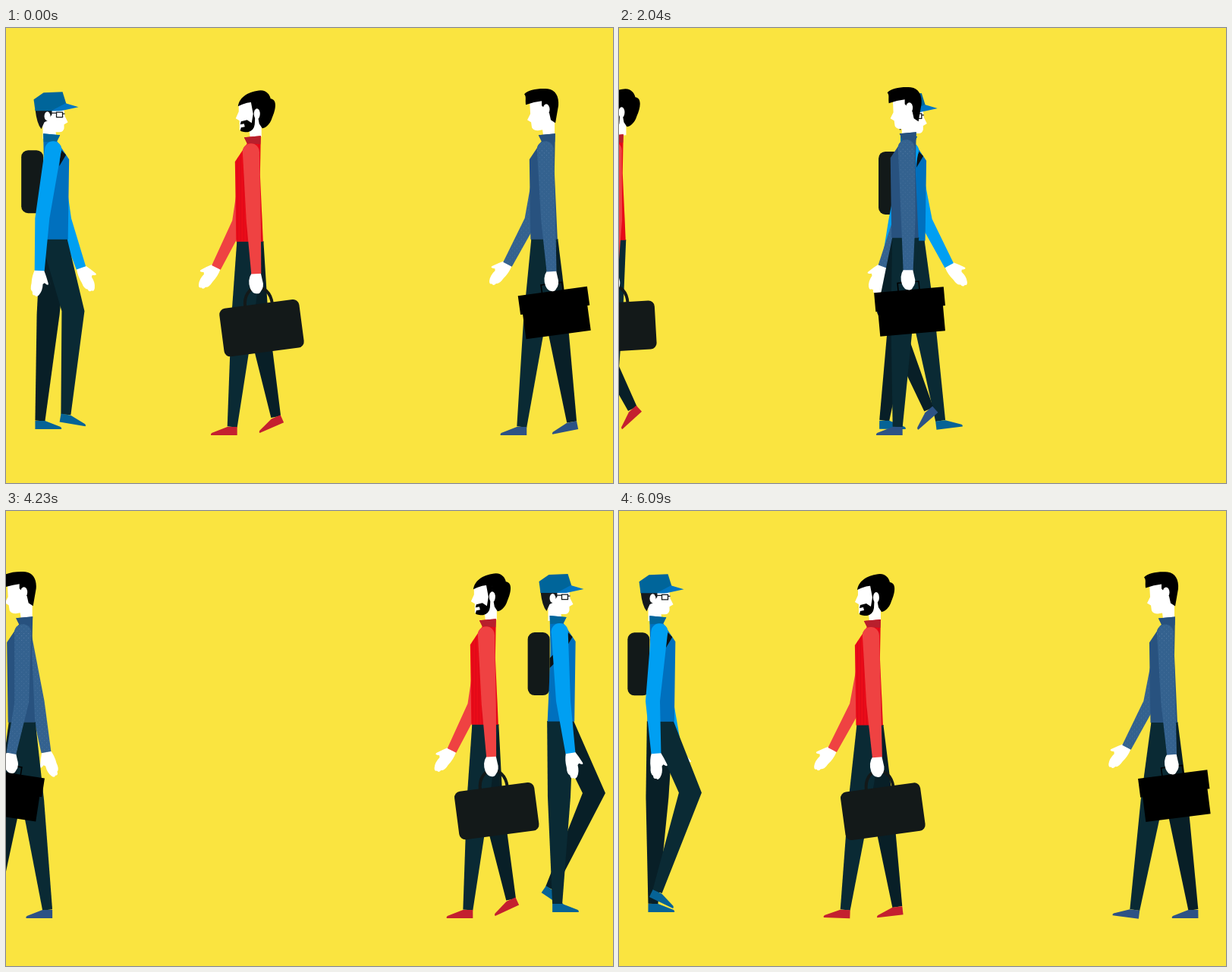
Write an HTML page with a canvas that moves like this. It is 800x600 px and loops after 6.12 s.

```html
<!DOCTYPE html>
<html lang="en">
<head>
<meta charset="utf-8">
<title>Three walkers</title>
<style>
html, body { margin: 0; width: 100%; height: 100%; overflow: hidden; background: #fae440; }
canvas { display: block; width: 800px; height: 600px; }
</style>
</head>
<body>
<canvas id="stage" width="800" height="600"></canvas>
<script>
const ctx = document.getElementById('stage').getContext('2d');
const LOOP = 6120, LAP = 6146, CYCLE = 960, EDGE = 90;
const RAD = Math.PI / 180;
const NEAR_LEG = '#0a2a34', FAR_LEG = '#081f27', BAG = '#131919';

const clamp = v => Math.max(0, Math.min(1, v));
const ease = s => s * s * (3 - 2 * s);
const hump = s => Math.sin(Math.PI * clamp(s)) ** 2;
const swing = (u, mean, amp, delay) => mean - amp * Math.cos(2 * Math.PI * (u - delay) / CYCLE);

// Phase 0 is heel strike; the foot is planted for the first half of the cycle.
function footPose(phase, speed) {
  const u = ((phase % CYCLE) + CYCLE) % CYCLE, half = CYCLE / 2;
  const front = 40, back = front - speed * half;
  if (u < half) return { x: front - speed * u, lift: 0, tilt: -8 * clamp(1 - u / 60), bend: 0 };
  const s = u / half - 1, rise = hump(s ** 0.85);
  return {
    x: back + (front - back) * ease(s) ** 3.2 + 6 * Math.sin(Math.PI * s),
    lift: 24 * rise,
    tilt: 46 * rise - 8 * s,
    bend: 52 * hump((s - 0.125) / 0.81)
  };
}

const freeArm = u => [swing(u, 0, 12, 0), swing(u, 8, 20, 40), swing(u, 9, 32, 40)];
const bagArm = u => [swing(u, -0.7, 1.7, 20), swing(u, 4, 8, 20), swing(u, 1.2, 9, 60)];

function poly(color, ...pts) {
  ctx.beginPath();
  pts.forEach(([x, y]) => ctx.lineTo(x, y));
  ctx.closePath();
  ctx.fillStyle = color;
  ctx.fill();
}

function shape(color, d) {
  ctx.fillStyle = color;
  ctx.fill(new Path2D(d));
}

function line(color, width, d) {
  ctx.strokeStyle = color;
  ctx.lineWidth = width;
  ctx.stroke(new Path2D(d));
}

function oval(color, x, y, rx, ry) {
  ctx.beginPath();
  ctx.ellipse(x, y, rx, ry, 0, 0, 7);
  ctx.fillStyle = color;
  ctx.fill();
}

function box(color, x, y, w, h, r) {
  ctx.beginPath();
  ctx.roundRect(x, y, w, h, r);
  ctx.fillStyle = color;
  ctx.fill();
}

function placed(x, y, deg, draw) {
  ctx.save();
  ctx.translate(x, y);
  ctx.rotate(deg * RAD);
  draw();
  ctx.restore();
}

// Two tapered segments a-b-c with half widths wa, wb, wc
function limb(color, a, b, c, wa, wb, wc) {
  const dx = c[0] - b[0], dy = c[1] - b[1], len = Math.hypot(dx, dy);
  const nx = dy / len * wc, ny = -dx / len * wc;
  poly(color, [a[0] - wa, a[1]], [a[0] + wa, a[1]], [b[0] + wb, b[1]],
    [c[0] + nx, c[1] + ny], [c[0] - nx, c[1] - ny], [b[0] - wb, b[1]]);
}

const along = ([x, y], deg, len) => [x + Math.sin(deg * RAD) * len, y + Math.cos(deg * RAD) * len];

function leg(man, phase, hipY, color) {
  const { x, lift, tilt, bend } = footPose(phase, man.speed);
  const y = man.ankle - lift - hipY, d = Math.hypot(x, y);
  const knee = [x * 0.416 + y / d * bend, y * 0.416 - x / d * bend];
  limb(color, [0, 0], knee, [x, y], 17.5, 15, 6.5);
  placed(x, y, tilt, () => shape(man.shoe, 'M-6.5 0H6.5L27 8Q29 9.5 28 11H-6.5Z'));
}

function arm(man, [upper, fore, last], draw) {
  const s = [-1, -118], e = along(s, upper, 92), w = along(e, fore, 69);
  draw(w, last);
  for (const fill of man.armFills) {
    oval(fill, s[0], s[1], 11, 11);
    limb(fill, s, e, w, 11, 9.5, 6.5);
  }
}

function openHand([x, y], deg) {
  placed(x, y, -deg, () => shape('#fff',
    'M-6 -1H6Q10 6 14 15Q15 19 9 15L7 17Q8 26 4 32Q1 36 -1 33Q-5 34 -5 29Q-9 27 -8 18Q-9 8 -6 -1Z'));
}

function fist([x, y], deg, bag) {
  placed(x, y + 17, -deg, bag);
  placed(x, y, 0, () => shape('#fff', 'M-6 -1H6Q12 8 8 19Q5 26 0 26Q-4 27 -6 23Q-11 17 -8 8Z'));
}

const torso = fill => shape(fill, 'M8 -137L-14 -139L-13 -88L-17 .5H18.5L20 -105L4 -129Z');
const collar = fill => shape(fill, 'M8 -137L-14 -139L-13.5 -128L4 -129Z');

function pattern(size, color, ...rects) {
  const tile = document.createElement('canvas');
  tile.width = tile.height = size;
  const c = tile.getContext('2d');
  c.fillStyle = color;
  rects.forEach(r => c.fillRect(...r));
  return ctx.createPattern(tile, 'repeat');
}

const dots = pattern(6, 'rgba(120,150,190,.35)', [0, 0, 1, 1], [3, 3, 1, 1]);
const stripes = pattern(4, 'rgba(190,0,30,.3)', [0, 0, 1, 4]);

const courier = {
  dir: 1, x: 63, speed: 0.1578, phase: -112, hip: 278.5, ankle: 518, headX: 0.8,
  shoe: '#066396', body: ['#0070be'], armFills: ['#009ff2'], collar: '#03659a',
  back() {
    box('#121919', -43, -117, 29, 83, 9);
  },
  front() {
    shape('#0b1216', 'M9 -118L16 -111L7 -96ZM-14 -83L-8 -89V-76L-14 -70Z');
  },
  head() {
    shape('#fff', 'M-18 -170H13L14 -162L18 -154L13 -151V-146Q12 -141 7 -141L2 -141L3 -135L-15 -132V-146Z');
    shape('#15191c', 'M-25 -171H-3V-164L-9 -156L-13 -154L-17 -145Q-23 -152 -25 -171Z');
    oval('#fff', -9, -162, 4, 6);
    line('#15191c', 1.3, 'M-6 -166H3M3 -167H11V-160.5H3ZM11 -165H14');
    shape('#00659a', 'M-27 -184L-14 -193L11 -194L16 -178L7 -169H-25Z');
    shape('#0076c4', 'M15 -179L32 -174L9 -169H-4Z');
  }
};

const bearded = {
  dir: -1, x: 322, speed: 0.1618, phase: 100, hip: 280.5, ankle: 526, headX: -2,
  shoe: '#c4202f', body: ['#ea0b18', stripes], armFills: ['#ef4242'], collar: '#b81f2c',
  bag() {
    line(BAG, 4, 'M-18 25C-18 -7 18 -7 18 25');
    box(BAG, -53, 23, 106, 64, 8);
  },
  head() {
    shape('#fff', 'M16 -182L16 -171L20 -162L15 -159V-147L2 -146L1 -137L-14 -138V-160L-8 -188Z');
    shape('#000', 'M17 -178C15 -191 2 -198 -13 -199C-21 -199 -25 -193 -26 -188C-35 -187 -33 -174 -28 -163' +
      'C-25 -153 -18 -149 -15 -149L-11 -155L-9 -166L-5 -174L-8 -184Q6 -184 17 -178Z');
    shape('#000', 'M-9 -187L0 -184L-3 -168L-1 -156L5 -160L13 -158L14 -154L9 -155L8 -151L13 -150L14 -146' +
      'Q12 -144 4 -144Q-4 -146 -5 -154L-6 -172Z');
    oval('#fff', -8, -168, 4, 7);
  }
};

const clerk = {
  dir: -1, x: 710, speed: 0.1628, phase: 60, hip: 277, ankle: 526, headX: -2,
  shoe: '#2d5285', body: ['#28527f'], armFills: ['#34628f', dots], collar: '#27517e',
  bag() {
    line('#000', 1.6, 'M-14 10V-1H14V10');
    shape('#000', 'M-46 9H46V34H43V67H-43V34H-46Z');
  },
  head() {
    shape('#fff', 'M20 -184L19 -165L23 -157L18 -154L17 -147Q15 -143 9 -143L3 -144L2 -137L-13 -138V-153L-12 -190Z');
    shape('#000', 'M25 -177C26 -184 24 -188 27 -191C22 -197 8 -199 -4 -198C-14 -197 -19 -188 -18 -176' +
      'L-14 -153L-8 -157L-6 -166L0 -172L4 -176V-182Q14 -181 25 -177Z');
    oval('#fff', -2, -171, 4.5, 7);
  }
};

const men = [courier, bearded, clerk];

function drawMan(man, t) {
  const at = time => man.x + man.dir * man.speed * time;
  // Once past the edge he comes back in on the other side, on the next lap.
  const gone = man.dir > 0 ? at(t) > 800 + EDGE : at(t) < -EDGE;
  const time = gone ? t - LAP : t;
  const u = man.phase + time, far = u + CYCLE / 2;
  const bob = Math.cos(4 * Math.PI * (u - 25) / CYCLE);
  const hipY = man.hip + 1.5 * bob;

  ctx.save();
  ctx.translate(at(time), hipY);
  ctx.scale(man.dir, 1);
  arm(man, freeArm(far), openHand);
  leg(man, far, hipY, FAR_LEG);
  leg(man, u, hipY, NEAR_LEG);
  if (man.back) man.back();
  placed(man.headX + 2 * bob, 0, 0, man.head);
  man.body.forEach(torso);
  collar(man.collar);
  if (man.front) man.front();
  if (man.bag) arm(man, bagArm(u), (wrist, deg) => fist(wrist, deg, man.bag));
  else arm(man, freeArm(u), openHand);
  ctx.restore();
}

function frame() {
  const t = performance.now() % LOOP;
  ctx.fillStyle = '#fae440';
  ctx.fillRect(0, 0, 800, 600);
  men.forEach(man => drawMan(man, t));
  requestAnimationFrame(frame);
}
frame();
</script>
</body>
</html>
```
